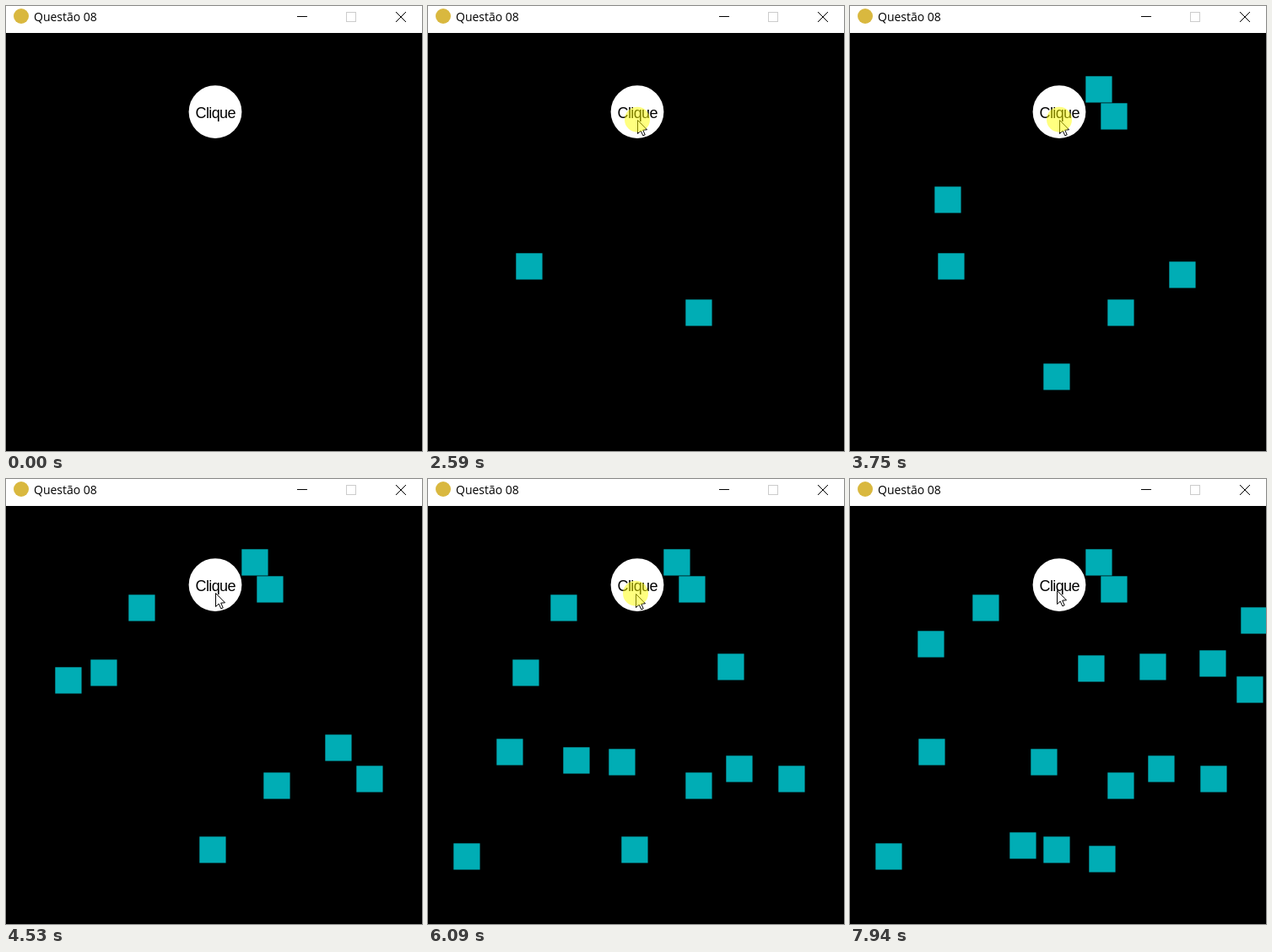
These frames come from a looping animation (493 by 528 pixels, 8000 ms). An HTML page with a canvas:

```html
<!DOCTYPE html>
<html lang="pt">
<head>
<meta charset="utf-8">
<title>Questão 08</title>
<style>
  html, body { margin: 0; width: 100%; height: 100%; overflow: hidden; background: #000; }
  canvas { display: block; }
</style>
</head>
<body>
<canvas id="stage" width="493" height="528"></canvas>
<script>
const ctx = document.getElementById('stage').getContext('2d');
const LOOP = 8000;
const STEP = 77.5;   // the pointer moves in steps of this many ms
const HOLD = 85;     // how long the button is held before each click counts
const SIZE = 31.25;

// Clicking pace: [time, clicks so far], slow at first and then faster.
const pace = [[0, 0], [1740, 1], [2360, 2], [2670, 3], [5222, 14], [8012, 32]];

// Pointer: [time, x, y]
const path = [
  [150, 417, 163], [400, 300, 110], [650, 247, 136], [1660, 249, 135],
  [5540, 249, 135], [6080, 247, 136], [6400, 247, 132], [7900, 246, 132]
];

// Each click adds a square at a point, or removes the square of an earlier click.
const clicks = [
  [305, 348], [104, 293], [229, 424], [279, 83], [297, 115], [100, 214], [378, 303],
  1, [145, 137], [58, 223], [415, 340], [81, 308],
  9, [343, 207], [214, 320],
  6, [30, 432], [353, 328], [160, 318], [414, 203], null,
  [458, 234], [189, 419], [270, 209], [215, 214],
  24, 5, [80, 180],
  18, [463, 152], [283, 435]
];

// Linear interpolation through key points whose first entry is the time.
function interpolate(keys, t) {
  const i = Math.max(1, keys.findIndex(key => key[0] > t));
  const [a, b] = [keys[i - 1], keys[i]];
  const s = (t - a[0]) / (b[0] - a[0]);
  return a.slice(1).map((v, k) => v + (b[k + 1] - v) * s);
}

const clickCount = t => Math.floor(interpolate(pace, t)[0]);

function squaresAt(t) {
  const live = [];
  clicks.slice(0, clickCount(t)).forEach((click, n) => {
    if (Array.isArray(click)) live[n] = click;
    else if (click !== null) delete live[click];
  });
  return live;
}

function pointerAt(t) {
  const stepped = Math.floor(t / STEP) * STEP;
  const time = Math.min(Math.max(stepped, path[0][0]), path.at(-1)[0] - 1);
  return interpolate(path, time).map(Math.round);
}

function disc(x, y, r, color) {
  ctx.fillStyle = color;
  ctx.beginPath();
  ctx.arc(x, y, r, 0, Math.PI * 2);
  ctx.fill();
}

function line(x1, y1, x2, y2) {
  ctx.beginPath();
  ctx.moveTo(x1, y1);
  ctx.lineTo(x2, y2);
  ctx.stroke();
}

function label(text, x, y, font, spacing) {
  ctx.fillStyle = '#000';
  ctx.font = font;
  ctx.letterSpacing = spacing;
  ctx.fillText(text, x, y);
}

function drawTitleBar() {
  ctx.fillStyle = '#fff';
  ctx.fillRect(0, 0, 493, 32);
  disc(18, 12, 9, '#d9b83f');
  label('Questão 08', 33, 18, '14px "Open Sans", "Noto Sans", sans-serif', '0px');
  ctx.lineWidth = 1;
  ctx.strokeStyle = '#000';
  line(345, 12.5, 357, 12.5);
  line(462, 7, 474, 19);
  line(474, 7, 462, 19);
  ctx.strokeStyle = '#ccc';
  ctx.strokeRect(403.5, 7.5, 11, 11);
}

function drawPointer(x, y) {
  ctx.save();
  ctx.translate(x - 0.5, y + 0.5);
  ctx.beginPath();
  [[0, 0], [0, 16], [3.7, 12.6], [6.3, 18.3], [8.7, 17.3], [6.2, 11.6], [11, 11.3]]
    .forEach(([px, py]) => ctx.lineTo(px, py));
  ctx.closePath();
  ctx.fillStyle = '#fff';
  ctx.fill();
  ctx.lineWidth = 1;
  ctx.strokeStyle = '#000';
  ctx.stroke();
  ctx.restore();
}

function draw(t) {
  ctx.fillStyle = '#000';
  ctx.fillRect(0, 0, 493, 528);
  drawTitleBar();

  ctx.fillStyle = '#00adb5';
  squaresAt(t).forEach(([x, y]) => ctx.fillRect(x + 0.3, y + 0.3, SIZE, SIZE));

  disc(248, 125.6, 31.4, '#fff');
  label('Clique', 224.5, 133, '18px "Liberation Sans", sans-serif', '-0.6px');

  if (t < path[0][0]) return;
  const [x, y] = pointerAt(t);
  drawPointer(x, y);
  if (clickCount(t + HOLD) > clickCount(t)) disc(x - 1, y - 0.3, 15, 'rgba(255, 255, 0, 0.5)');
}

const start = performance.now();
function frame() {
  // Stay inside the pace keys: the last press is still held when the loop ends.
  draw(Math.min((performance.now() - start) % LOOP, LOOP - 1));
  requestAnimationFrame(frame);
}
frame();
</script>
</body>
</html>
```
